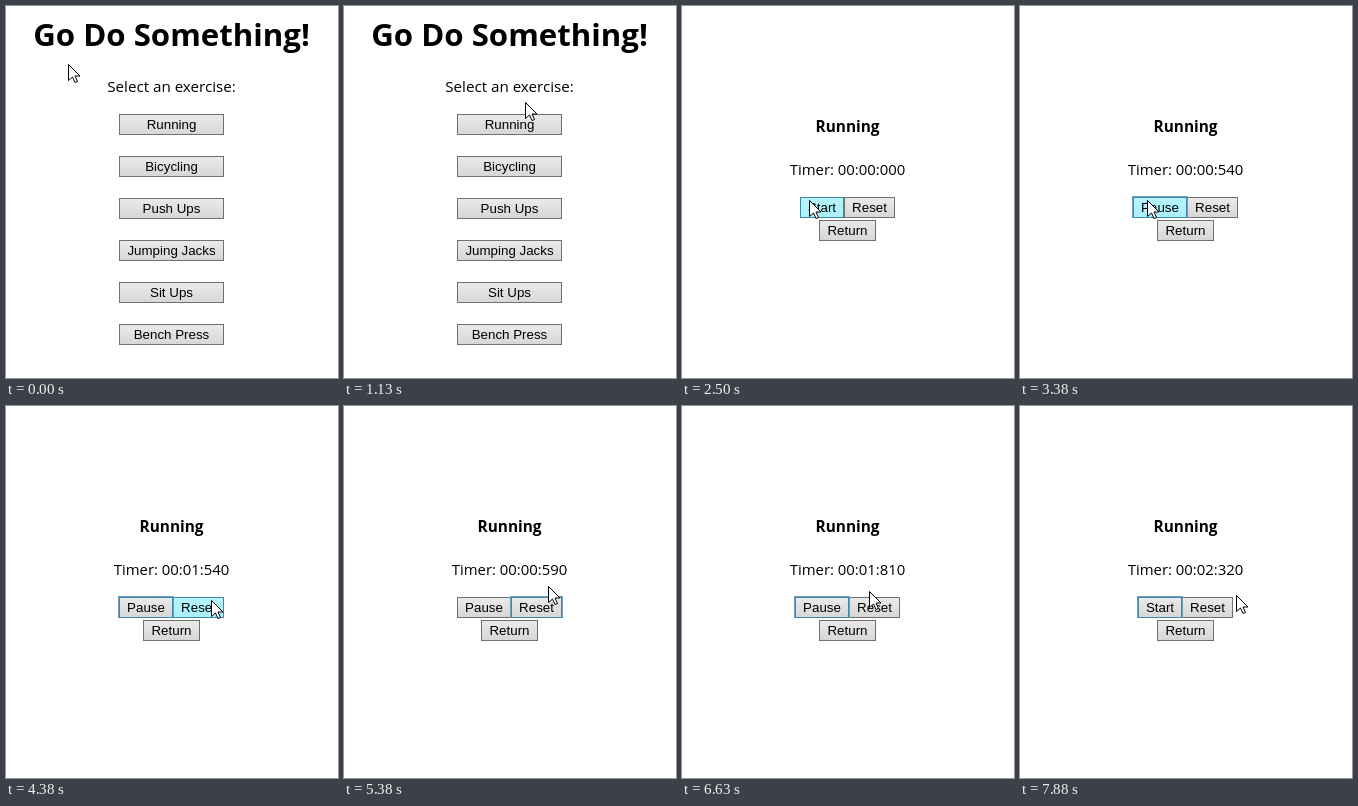
These frames come from a looping animation (332 px wide and 372 px high, 8 s). An HTML page with a canvas:

```html
<!DOCTYPE html>
<html lang="en">
<head>
<meta charset="utf-8">
<title>Exercise timer</title>
<style>
  html, body { margin: 0; width: 100%; height: 100%; overflow: hidden; background: #fff; }
  canvas { display: block; }
</style>
</head>
<body>
<canvas id="stage" width="332" height="372"></canvas>
<script>
const ctx = document.getElementById("stage").getContext("2d");
const LOOP = 8000, STEP = 125, GLIDE = 375;
const CENTER = 165.5, BUTTON_HEIGHT = 21;
const SANS = '"Open Sans", "Noto Sans", sans-serif';
const BUTTON_FONT = '13.333px "Liberation Sans", Arial, sans-serif';
const EXERCISES = ["Running", "Bicycling", "Push Ups", "Jumping Jacks", "Sit Ups", "Bench Press"];
const ARROW = new Path2D("M0 0V16L4 12.5L6.5 18L9 17L6.5 11.5H11.5Z");

// Click times
const OPEN = 1500, START = 2835, RESET = 4785, PAUSE = 5875, RESUME = 6125, STOP = 7135;
const RESUME_LAG = 30;

// The pointer rests between stops and reaches each one at its time.
const STOPS = [
  { at: 0, x: 62, y: 58 },
  { at: 500, x: 115, y: 75 },
  { at: 1125, x: 181, y: 96 },
  { at: OPEN, x: 164, y: 113 },
  { at: 2375, x: 127, y: 194 },
  { at: 4125, x: 205, y: 194 },
  { at: 5375, x: 204, y: 180 },
  { at: PAUSE, x: 150, y: 197 },
  { at: 6625, x: 187, y: 185 },
  { at: 7000, x: 150, y: 197 },
  { at: 7750, x: 231, y: 176 },
  { at: 7875, x: 216, y: 189 }
];

function pointerAt(t) {
  const next = STOPS.find(stop => stop.at >= t);
  const last = STOPS[STOPS.indexOf(next) - 1] ?? next;
  const begin = Math.max(last.at, next.at - GLIDE);
  const u = t <= begin ? 0 : (t - begin) / (next.at - begin);
  const mix = (a, b) => Math.round(a + (b - a) * u);
  return { x: mix(last.x, next.x), y: mix(last.y, next.y) };
}

function elapsed(t) {
  if (t < RESET) return Math.max(0, t - START);
  if (t < RESUME) return Math.min(t, PAUSE) - RESET;
  return Math.min(t, STOP) - RESET - RESUME_LAG;
}

function clockText(ms) {
  const pad = (n, size) => String(Math.floor(n)).padStart(size, "0");
  const v = Math.floor(ms / 10) * 10;
  return `${pad(v / 60000, 2)}:${pad(v / 1000 % 60, 2)}:${pad(v % 1000, 3)}`;
}

function text(str, x, y, font) {
  ctx.font = font;
  ctx.textAlign = "center";
  ctx.fillStyle = "#000";
  ctx.fillText(str, x, y);
}

function button(label, x, y, w, pointer, focused = false) {
  const h = BUTTON_HEIGHT;
  const hover = pointer.x >= x && pointer.x < x + w && pointer.y >= y && pointer.y < y + h;
  if (focused) {
    ctx.fillStyle = "#6f9fba";
    ctx.fillRect(x - 1, y - 1, w + 2, h + 1);
  }
  ctx.fillStyle = hover || focused ? "#3f86a8" : "#707070";
  ctx.fillRect(x, y, w, h);
  const face = ctx.createLinearGradient(0, y, 0, y + h);
  face.addColorStop(0, hover ? "#b4f5ff" : "#ebebeb");
  face.addColorStop(1, hover ? "#aaf0fc" : "#d6d6d6");
  ctx.fillStyle = face;
  ctx.fillRect(x + 1, y + 1, w - 2, h - 2);
  text(label, x + w / 2, y + 15, BUTTON_FONT);
}

function menuPage(pointer) {
  text("Go Do Something!", CENTER, 40, `bold 31.2px ${SANS}`);
  text("Select an exercise:", CENTER, 86, `15.2px ${SANS}`);
  EXERCISES.forEach((name, i) => button(name, 113, 108 + 42 * i, 105, pointer));
}

function timerPage(t, pointer) {
  text("Running", CENTER, 126, `bold 15.4px ${SANS}`);
  text("Timer: " + clockText(elapsed(t)), CENTER, 169, `14.9px ${SANS}`);

  const running = (t >= START && t < PAUSE) || (t >= RESUME && t < STOP);
  const resetFocus = t >= RESET && t < PAUSE;
  const toggleWidth = running ? 54 : 44, resetWidth = 51;
  const left = Math.round(CENTER - (toggleWidth + resetWidth) / 2);
  const toggle = () => button(running ? "Pause" : "Start", left, 191, toggleWidth, pointer, t >= START && !resetFocus);
  const reset = () => button("Reset", left + toggleWidth, 191, resetWidth, pointer, resetFocus);

  // The focused button overlaps its neighbour.
  for (const draw of resetFocus ? [toggle, reset] : [reset, toggle]) draw();
  button("Return", 137, 214, 57, pointer);
}

function drawPointer({ x, y }) {
  ctx.save();
  ctx.translate(x + 0.5, y + 0.5);
  ctx.fillStyle = "#fff";
  ctx.fill(ARROW);
  ctx.strokeStyle = "#000";
  ctx.stroke(ARROW);
  ctx.restore();
}

function render(now) {
  const t = Math.floor((now % LOOP) / STEP) * STEP;
  const pointer = pointerAt(t);
  ctx.fillStyle = "#fff";
  ctx.fillRect(0, 0, 332, 372);
  if (t < OPEN) menuPage(pointer);
  else timerPage(t, pointer);
  drawPointer(pointer);
}

let origin;
function tick(now) {
  origin ??= now;
  render(now - origin);
  requestAnimationFrame(tick);
}
render(0);
requestAnimationFrame(tick);
</script>
</body>
</html>
```
